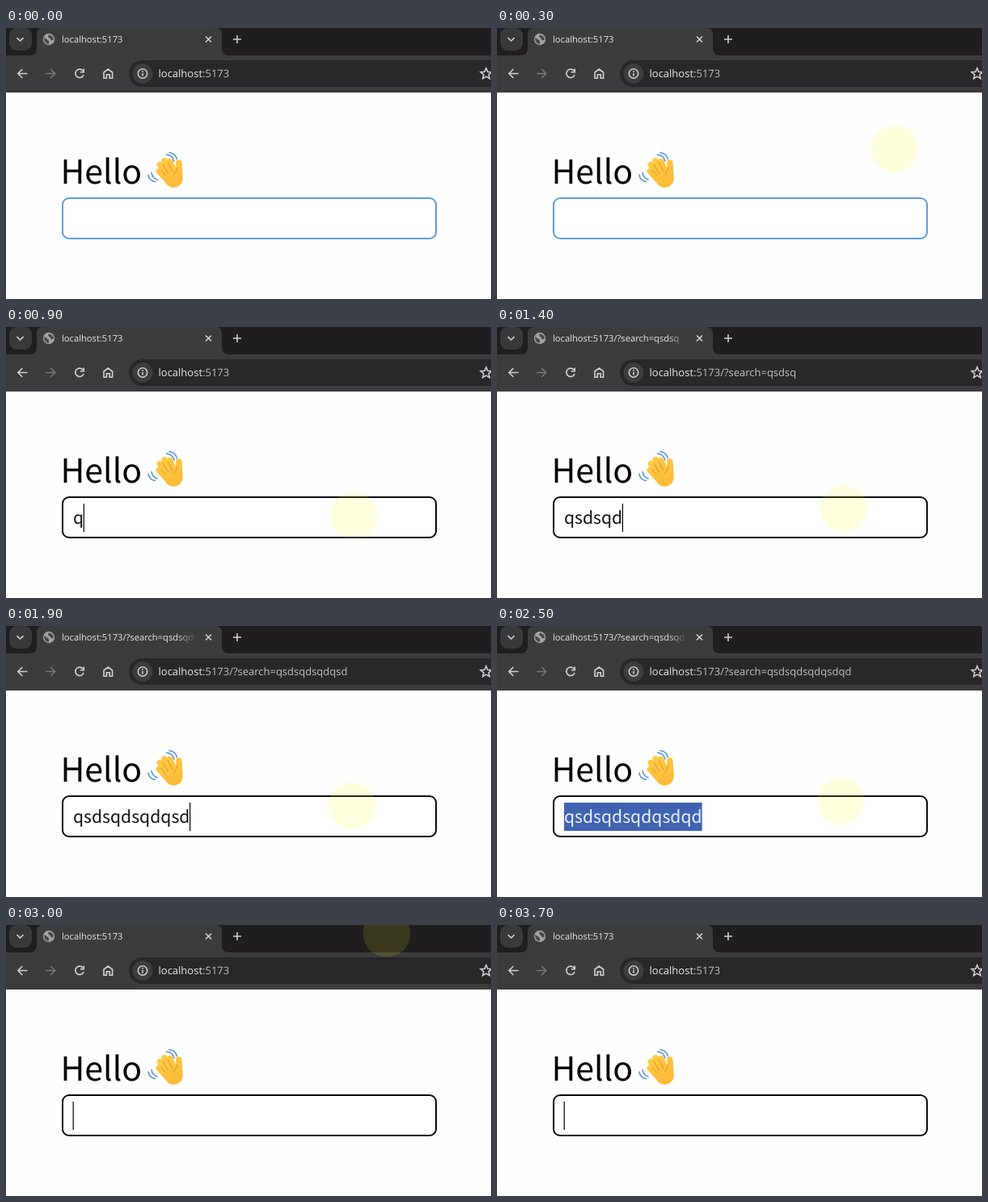
Write an HTML page that moves like this. It is 600 px wide and 336 px high and loops after 3.8 s.

```html
<!DOCTYPE html>
<html lang="en">
<head>
<meta charset="utf-8">
<title>Search box</title>
<style>
html, body { margin: 0; width: 100%; height: 100%; overflow: hidden; background: #fefefe; }
svg { display: block; width: 600px; height: 336px; }
text { text-rendering: geometricPrecision; white-space: pre; }
.ui { font-family: "Open Sans", "Noto Sans", sans-serif; }
.page { font-family: "Noto Sans CJK JP", "Noto Sans CJK SC", "Noto Sans CJK", "Noto Sans", sans-serif; }
.line { fill: none; stroke: #d2d1d3; stroke-width: 1.6; }
.round { fill: none; stroke-linecap: round; stroke-linejoin: round; }
</style>
</head>
<body>
<svg viewBox="0 0 600 336">
  <defs>
    <linearGradient id="fade" gradientUnits="userSpaceOnUse" x1="212" x2="235">
      <stop stop-color="#e6e5e7"/><stop offset="1" stop-color="#e6e5e7" stop-opacity="0"/>
    </linearGradient>
    <linearGradient id="skin" gradientUnits="userSpaceOnUse" x1="190" y1="162" x2="212" y2="198">
      <stop stop-color="#ffcb45"/><stop offset="1" stop-color="#fbb936"/>
    </linearGradient>
  </defs>

  <!-- Tab strip and toolbar -->
  <rect width="600" height="80" fill="#1f1d20"/>
  <path fill="#3c3b3d" d="M0 34H29Q38 34 38 25V8Q38 0 46 0H259Q267 0 267 8V25Q267 34 276 34H600V80H0Z"/>
  <rect x="4" y="0" width="28" height="28" rx="9" fill="#39383a"/>
  <path class="line" d="M13.5 12.2L17.5 16L21.5 12.2"/>
  <circle cx="53" cy="14" r="7.2" fill="#a3a2a5"/>
  <path fill="#48474a" d="M47.5 12L51 14.5L53 16V20Q47.5 19 47 13ZM53 8.2L52 11L54.5 13L56 15.5L59 14.5Q58.5 9.5 53 8.2Z"/>
  <text id="tab" class="ui" x="69" y="18.3" font-size="11.2" fill="url(#fade)"></text>
  <path class="line" d="M247 10.5L254 17.5M254 10.5L247 17.5M281 14H291M286 9V19"/>
  <path class="line" d="M26.5 56.5H15M20.3 51L14.8 56.5L20.3 62"/>
  <path class="line" style="stroke:#78777a" d="M49 56.5H60.5M55.2 51L60.7 56.5L55.2 62"/>
  <path class="line" d="M95.3 53.3A5.2 5.2 0 1 0 96 58M96.2 50.5V54.8H91.8"/>
  <path class="line" d="M121 55L126.3 51L131.6 55V62.3H128.2V57.8H124.4V62.3H121Z"/>
  <rect x="152" y="40" width="470" height="33" rx="16.5" fill="#282729"/>
  <circle cx="169" cy="56.5" r="12.5" fill="#3d3c3f"/>
  <circle class="line" cx="169" cy="56.5" r="5.7" stroke-width="1.4"/>
  <path class="line" d="M169 55.8V59.6M169 53V54.6"/>
  <text class="ui" x="188.5" y="61" font-size="13" fill="#e9e8ea">localhost<tspan id="url" fill="#c2c1c4"></tspan></text>
  <path class="line" stroke-width="1.4" d="M594 49.8L595.9 54.3L600.8 54.7L597.1 57.9L598.2 62.6L594 60.1L589.8 62.6L590.9 57.9L587.2 54.7L592.1 54.3Z"/>

  <!-- Page -->
  <text class="page" x="67.5" y="193" font-size="41">Hello</text>
  <g class="round">
    <path stroke="url(#skin)" stroke-width="7.4" d="M205 183L196 164.5M201 185L190.3 169.5M198 187L189.3 177.5M209 180L202.8 165.5M214.5 182L213.8 167"/>
    <path fill="url(#skin)" d="M190 180L206 168L211.5 177L217.5 168L218.8 187Q218 195 210 197.5Q203 199 198 193Z"/>
    <path stroke="#d9952f" stroke-width="1" d="M194 169L200.5 180M200.3 167L206 178M192 176.5L197.5 183M212 173Q211 178 207.5 182"/>
    <path stroke="#4f8fd6" stroke-width="1.5" d="M198.5 157Q206 157.5 208 165M202 154.5Q210 155.5 211.2 162.5M180 179.5Q181 186 187 188M176 182Q177 189.5 184.5 190.5"/>
  </g>
  <rect id="box" x="70" y="211" width="462" height="50" rx="8" fill="#fff" stroke-width="2"/>
  <rect id="sel" x="83" y="219" height="35" fill="#3f62b1"/>
  <text id="field" class="page" x="83" y="244" font-size="21.15"></text>
  <rect id="caret" y="219" width="1.2" height="35"/>
  <circle id="spot" r="29.3" fill="#ff0" fill-opacity=".12"/>
</svg>
<script>
const $ = id => document.getElementById(id);
const LOOP = 3800, STEP = 100;
const word = "qsdsqdsqdqsdqd";
const keys = [880, 970, 1080, 1210, 1290, 1380, 1470, 1580, 1690, 1780, 1820, 1850, 1960, 2080];
const SELECT = 2500, CLEAR = 2600, FOCUS = 700;

// Pointer highlight: time, x, y
const path = [
  [100, 588, 15], [200, 546, 85], [300, 492, 150], [400, 450, 190], [500, 432, 204],
  [700, 430, 232], [900, 430, 234], [1200, 429, 226], [1400, 429, 225], [1900, 428, 223],
  [2200, 425.5, 217], [2700, 425.5, 217], [2800, 428, 196], [2900, 440, 110],
  [3000, 471, 10.5], [3100, 572, -8]
];

function pointer(t) {
  const i = path.findIndex(p => p[0] >= t);
  if (i < 0 || t < path[0][0]) return null;
  const b = path[i], a = path[i - 1] || b;
  const k = a === b ? 0 : (t - a[0]) / (b[0] - a[0]);
  return [a[1] + (b[1] - a[1]) * k, a[2] + (b[2] - a[2]) * k];
}

const typed = t => t >= CLEAR ? "" : word.slice(0, keys.filter(k => k <= t).length);
const show = (id, on) => $(id).setAttribute("visibility", on ? "visible" : "hidden");

function draw(t) {
  const query = t >= CLEAR ? "" : typed(t - 40);
  const address = ":5173" + (query && "/?search=" + query);
  $("tab").textContent = "localhost" + address;
  $("url").textContent = address;

  const selected = t >= SELECT && t < CLEAR;
  $("field").textContent = typed(t);
  $("field").setAttribute("fill", selected ? "#eef4ff" : "#111");
  const width = typed(t) ? $("field").getComputedTextLength() : 0;
  $("sel").setAttribute("width", width);
  show("sel", selected);
  $("caret").setAttribute("x", 82.6 + width);
  show("caret", t >= FOCUS && !selected && !(t >= 3200 && t < 3700));
  $("box").setAttribute("stroke", t < 500 ? "#5c9ee0" : t < FOCUS ? "#1d50ae" : "#0b0b0d");

  const p = pointer(t);
  show("spot", p);
  if (p) $("spot").setAttribute("transform", `translate(${p})`);
}

const start = performance.now();
function tick() {
  const t = (performance.now() - start) % LOOP;
  draw(Math.floor(t / STEP) * STEP);
  requestAnimationFrame(tick);
}
tick();
</script>
</body>
</html>
```
